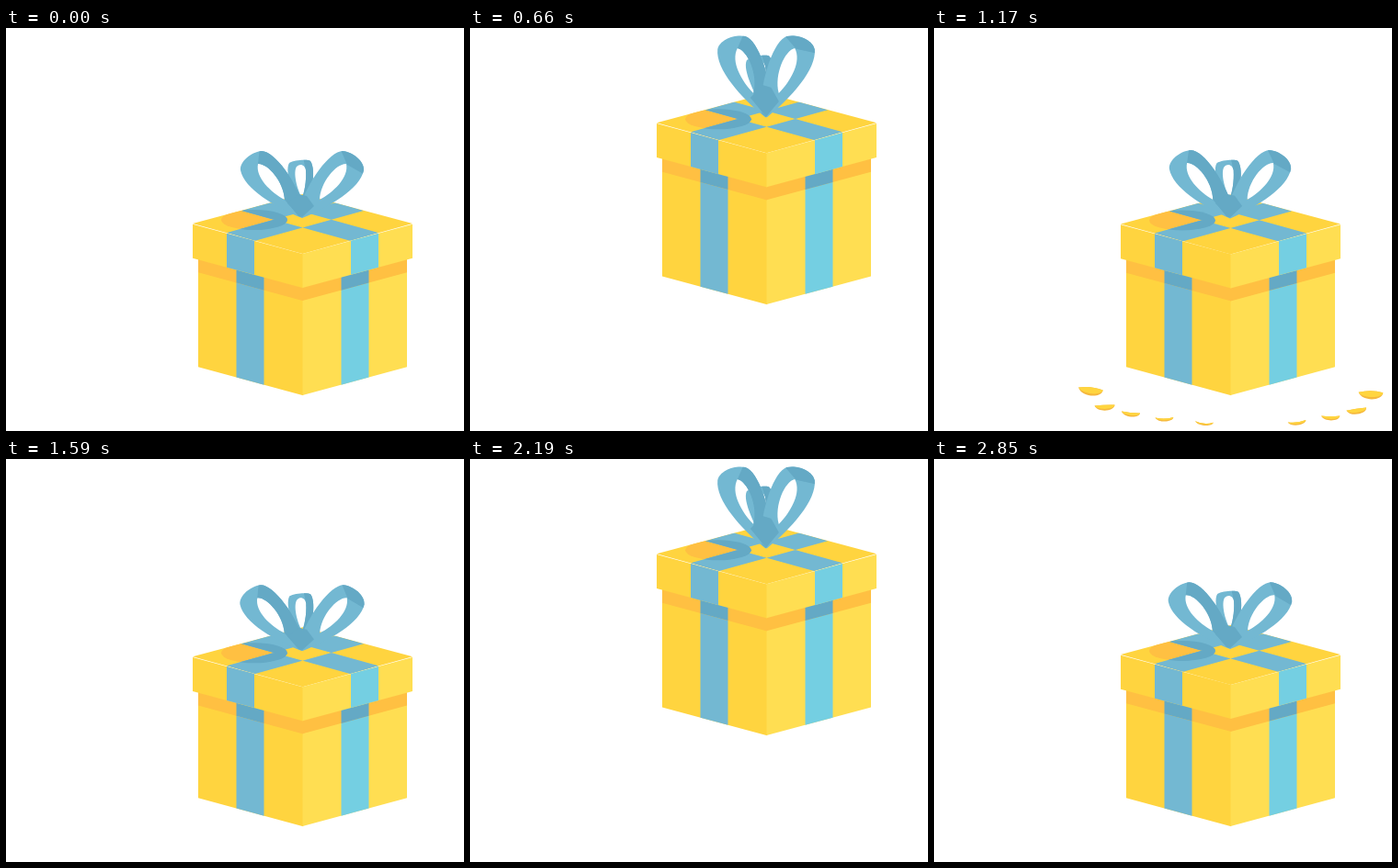
Animation of 498x439 px, one loop 2880 ms. Source, as an HTML page with a canvas:

```html
<!DOCTYPE html>
<html>
<head>
<meta charset="utf-8">
<style>
html, body { margin: 0; width: 100%; height: 100%; overflow: hidden; background: #fff }
canvas { display: block }
</style>
</head>
<body>
<canvas id="stage" width="498" height="439"></canvas>
<script>
const c = document.getElementById('stage').getContext('2d');
const { PI, sin, cos, exp, sqrt, min, max } = Math;
const LOOP = 2880, CYCLE = 1530, TAKEOFF = 390, LANDING = 810, JUMP = 108;
const MID = 322.5, SLOPE = .27;
const YELLOW = '#ffd43f', PALE = '#ffde52', ORANGE = '#ffc042';
const BLUE = '#73b8d2', CYAN = '#74cfe2', DARK = '#64a9c5';

const SIDE_LOOP = new Path2D('M0 2C-30 -10-63 -30-67 -50C-68 -60-55 -70-44 -71C-30 -71-6 -38 4 -6Z' +
  'M-48 -57C-38 -58-20 -38-19 -18C-34 -26-51 -42-48 -57Z');
const SMALL_LOOP = new Path2D('M0 0C-8 -20-20 -48-14 -58C-8 -62 8 -62 9 -60C16 -50 10 -20 2 0Z' +
  'M-6 -54C-2 -58 3 -56 4 -50C5 -38 2 -25 0 -20C-6 -30-10 -48-6 -54Z');
const UPPER_BAND = new Path2D('M-46 -75H10V5L-4 0L-19 -18L-48 -57Z');
const TIP = new Path2D('M-42 -72H-70V-44L-49 -56Z');
const SMALL_BACK = new Path2D('M1 -64H16V0H0V-20L4 -50Z');
const KNOT = new Path2D('M-16 -14L-4 -24L5 -22L13 -11L0 1Z');
const LID_TOP = new Path2D('M203 213L322.5 181L442 213L322.5 246Z');
const CROSS = new Path2D('M240 223L359 190L389 199L270 232ZM375 232L256 199L286 190L405 223Z');

function fill(color, path) {
  c.fillStyle = color;
  c.fill(path, 'evenodd');
}

// Runs paint with its own transform and clip
function layer(paint) {
  c.save();
  paint();
  c.restore();
}

// A strip of wall from near to far on one side of the front edge
function wall(color, side, near, far, top, bottom) {
  const x0 = MID + side * near, x1 = MID + side * far;
  c.fillStyle = color;
  c.beginPath();
  c.moveTo(x0, top - near * SLOPE);
  c.lineTo(x1, top - far * SLOPE);
  c.lineTo(x1, bottom - far * SLOPE);
  c.lineTo(x0, bottom - near * SLOPE);
  c.fill();
}

function walls(half, strip, top, bottom, left, right, ribbonLeft, ribbonRight) {
  wall(left, -1, -.6, half, top, bottom);
  wall(right, 1, 0, half, top, bottom);
  wall(ribbonLeft, -1, strip, strip + 30, top, bottom);
  wall(ribbonRight, 1, strip, strip + 30, top, bottom);
}

function spot(color) {
  c.fillStyle = color;
  c.beginPath();
  c.ellipse(270, 209, 36, 11, 0, 0, 7);
  c.fill();
}

function drawLid() {
  fill(YELLOW, LID_TOP);
  layer(() => {
    c.clip(LID_TOP);
    spot(ORANGE);
    fill(BLUE, CROSS);
    c.clip(CROSS);
    spot(DARK);
  });
  walls(119.5, 52.5, 246, 283, YELLOW, PALE, BLUE, CYAN);
}

function ribbon(path, shade, angle, flip = 1) {
  layer(() => {
    c.scale(flip, 1);
    c.rotate(angle);
    fill(BLUE, path);
    c.clip(path, 'evenodd');
    fill(DARK, shade);
  });
}

function drawBow(open) {
  layer(() => {
    c.translate(322, 205);
    c.scale(1 - .07 * open, 1 - .07 * open);
    ribbon(SMALL_LOOP, SMALL_BACK, .1 * open);
    ribbon(SIDE_LOOP, UPPER_BAND, -.3 * open);
    ribbon(SIDE_LOOP, TIP, -.3 * open, -1);
    c.scale(1, 1 - .3 * open);
    fill(DARK, KNOT);
  });
}

function drawTrails(t, up) {
  if (t < TAKEOFF || t > 560) return;
  const len = 46 * sin(PI * (t - TAKEOFF) / (560 - TAKEOFF));
  c.strokeStyle = '#fadc74';
  c.lineWidth = 1.5;
  for (const side of [-1, 0, 1]) {
    const x = MID - 1 + side * 111, y = 408 - up - 30 * side * side;
    const end = len * (side ? 1.05 : .75);
    c.beginPath();
    c.moveTo(x, y);
    c.quadraticCurveTo(x, y + end * .6, x + side * 3.5, y + end);
    c.stroke();
  }
}

function drawChip(x, y, w, h, angle, dip) {
  layer(() => {
    c.translate(x, y);
    c.rotate(angle);
    c.scale(w, h);
    for (const [color, depth] of [['#f5b83d', .85], ['#ffd53f', .5]]) {
      c.fillStyle = color;
      c.beginPath();
      c.moveTo(-.5, -.2);
      c.quadraticCurveTo(0, dip, .5, -.25);
      c.bezierCurveTo(.5, depth * .8, -.35, depth, -.5, -.2);
      c.fill();
    }
  });
}

// Chips curve round the foot of the box, drift outwards and shrink away
function drawChips(t) {
  if (t < 800 || t > 1310) return;
  const out = 1 - (1 - min(1, (t - 800) / 380)) ** 2;
  const size = min(1, (t - 780) / 80, (1310 - t) / 240);
  for (const [side, count] of [[-1, 5], [1, 4]])
    for (let i = 0; i < count; i++) {
      const u = i / 4;
      const x = MID + side * (127 - 103 * u ** 1.5) * (.9 + .3 * out);
      const y = 374 + 35 * sqrt(u) + 32 * (out - .335) + max(0, side * 4);
      const w = 34 + 12 * (1 - u) ** 4, h = 17 - 8 * sqrt(u);
      drawChip(x, y, w * size, h * size, .1 * sin(3 * i + 1) - side * .05, 1.1 * u - .6);
    }
}

// Offset of the lid from the body: crouch, lift in the air, settle
function lidShift(t) {
  if (t < TAKEOFF) return 10 * sin(PI * t / TAKEOFF) ** 2;
  if (t < LANDING) return -12 * sin(PI * (t - TAKEOFF) / (LANDING - TAKEOFF));
  const s = t - LANDING;
  return 7.5 * exp(-s / 150) * sin(2 * PI * s / 260);
}

// 1 spreads the bow wide, -1 draws it tall
function bowOpen(t) {
  if (t < 410) return (1 - cos(PI * t / 410)) / 2;
  if (t < 670) return cos(PI * (t - 410) / 260);
  const s = t - 670;
  return -exp(-s / 200) * cos(2 * PI * s / 490);
}

function draw(now) {
  const t = now % LOOP % CYCLE;
  const p = (t - TAKEOFF) / (LANDING - TAKEOFF);
  const up = max(0, 4 * JUMP * p * (1 - p));
  const lid = lidShift(t);
  c.fillStyle = '#fff';
  c.fillRect(0, 0, 498, 439);
  drawTrails(t, up);
  drawChips(t);
  layer(() => {
    c.translate(0, -up);
    walls(113.5, 42, 275 + lid, 400, YELLOW, PALE, BLUE, CYAN);
    c.translate(0, lid);
    walls(113.5, 42, 275, 297, ORANGE, ORANGE, DARK, DARK);
    drawLid();
    drawBow(bowOpen(t));
  });
}

const start = performance.now();
function tick() {
  draw(performance.now() - start);
  requestAnimationFrame(tick);
}
tick();
</script>
</body>
</html>
```
